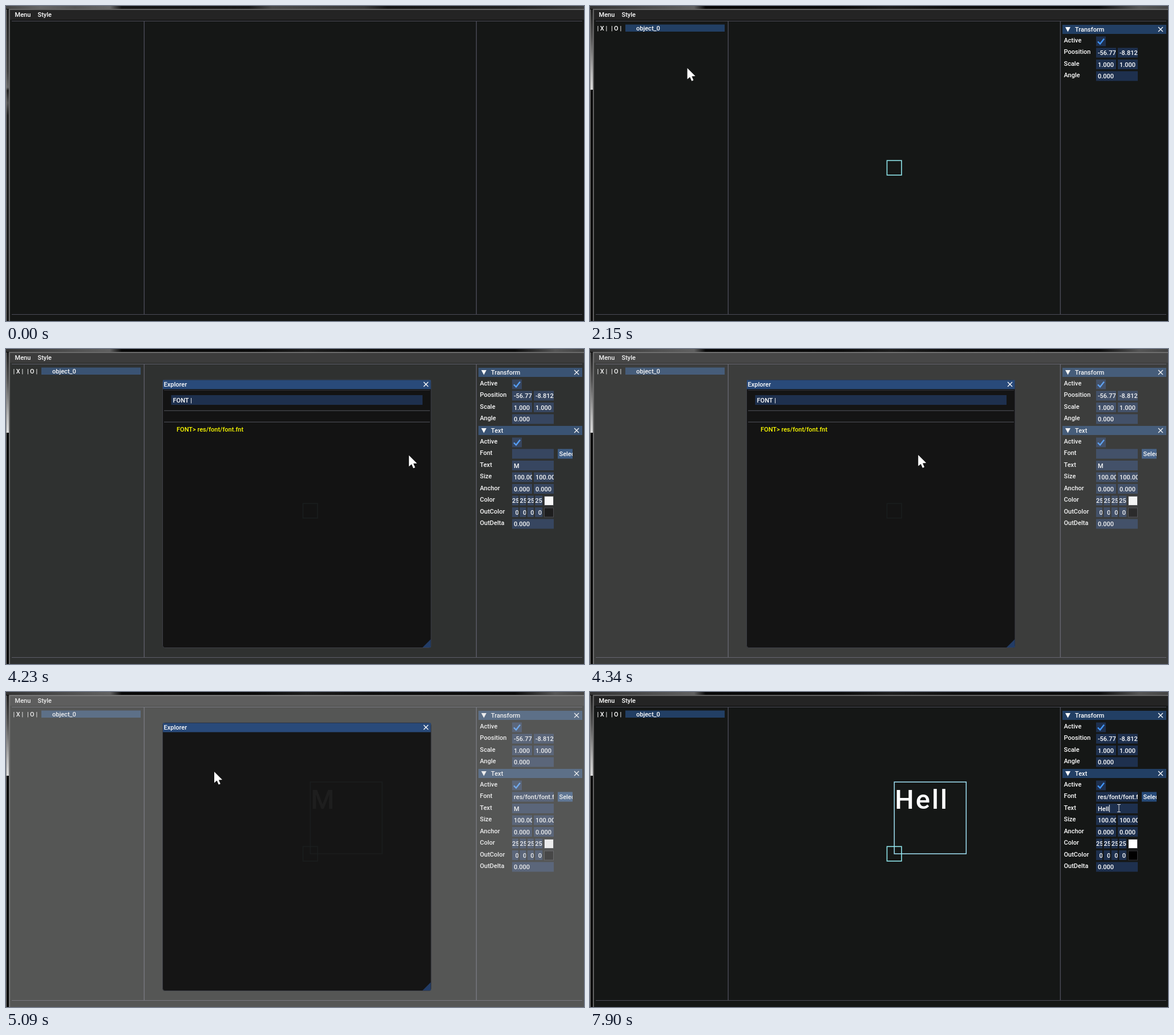
Animation of 1013 by 553 pixels, one loop 8000 ms. Source, as an HTML page with a canvas:

```html
<!DOCTYPE html>
<html lang="en">
<head>
<meta charset="utf-8">
<title>Scene editor</title>
<style>
  html, body { margin: 0; width: 100%; height: 100%; overflow: hidden; background: #151716; }
  canvas { display: block; }
</style>
</head>
<body>
<canvas id="stage" width="1013" height="553"></canvas>
<script>
const ctx = document.getElementById('stage').getContext('2d');
const LOOP = 8000, TICK = 108.33;
const FONT = '500 11px Roboto, sans-serif';
const LINE = '#4b4b57', FIELD = '#1e304e', HEADER = '#223f64', ACCENT = '#4296fa';

// Pointer path: time, x, y
const POINTER = [
  [100, 300, 310], [840, 141, 96.5], [1090, 141, 96.5], [1400, 112, 42], [1740, 112, 42],
  [2490, 250, 200], [2820, 250, 200], [3250, 926, 198], [3560, 956, 180],
  [3780, 966, 188], [4010, 966, 188], [4340, 567, 186], [4760, 365, 140],
  [5190, 365, 140], [5640, 934, 211], [5750, 934, 211], [6060, 927, 204], [LOOP, 927, 204]
];

const clamp = v => Math.max(0, Math.min(1, v));
const ramp = (t, a, b) => clamp((t - a) / (b - a));

function rect(x, y, w, h, color) {
  ctx.fillStyle = color;
  ctx.fillRect(x, y, w, h);
}

function text(s, x, midY, color = '#fff') {
  ctx.font = FONT;
  ctx.fillStyle = color;
  ctx.fillText(s, x, midY + 4);
}

function path(points, color, width) {
  ctx.beginPath();
  points.forEach(([x, y]) => ctx.lineTo(x, y));
  if (width) {
    ctx.strokeStyle = color;
    ctx.lineWidth = width;
    ctx.stroke();
  } else {
    ctx.fillStyle = color;
    ctx.fill();
  }
}

function outline(x, y, size, color) {
  ctx.strokeStyle = color;
  ctx.lineWidth = 1.6;
  ctx.strokeRect(x, y, size, size);
}

function clipped(x, y, w, h, draw) {
  ctx.save();
  ctx.beginPath();
  ctx.rect(x, y, w, h);
  ctx.clip();
  draw();
  ctx.restore();
}

function gradient(x, y, w, h, stops) {
  const g = w > h ? ctx.createLinearGradient(x, 0, x + w, 0) : ctx.createLinearGradient(0, y, 0, y + h);
  stops.forEach(([at, color]) => g.addColorStop(at, color));
  rect(x, y, w, h, g);
}

function closeIcon(x, y) {
  path([[x - 4, y - 4], [x + 4, y + 4]], '#fff', 1.2);
  path([[x + 4, y - 4], [x - 4, y + 4]], '#fff', 1.2);
}

function field(x, midY, w, value, pad = 3) {
  rect(x, midY - 8.5, w, 17, FIELD);
  clipped(x, midY - 9, w, 18, () => text(value, x + pad, midY));
}

function header(title, y) {
  rect(828, y - 8, 182, 16, HEADER);
  path([[833, y - 4], [842, y - 4], [837.5, y + 4.5]], '#fff');
  text(title, 850, y);
  closeIcon(1000, y);
}

function checkRow(y) {
  text('Active', 830.5, y);
  rect(887, y - 6, 17, 17, FIELD);
  path([[890, y + 3], [894, y + 7], [901, y - 2]], ACCENT, 2.4);
}

function row(label, y, ...values) {
  text(label, 830.5, y);
  const w = values.length === 1 ? 73 : 35;
  values.forEach((v, i) => field(887 + i * 38, y + 2, w, v));
}

function colorRow(label, y, value, pad, swatch) {
  text(label, 830.5, y);
  for (let i = 0; i < 4; i++) field(887 + i * 13.4, y + 2, i === 3 ? 13 : 11, value, pad);
  rect(943, y - 6, 17, 17, '#34353a');
  rect(944, y - 5, 15, 15, swatch);
}

function backdrop(t) {
  rect(0, 0, 1013, 553, '#080808');
  if (t < 100) {
    gradient(0, 0, 1013, 5, [[0, '#444'], [.06, '#666'], [.12, '#555'], [.18, '#666'], [.2, '#151515'], [.42, '#181818'],
      [.46, '#484848'], [.62, '#383838'], [.66, '#151515'], [.88, '#222'], [1, '#3c3c3c']]);
    gradient(0, 6, 5, 547, [[0, '#222'], [.2, '#444'], [.25, '#666'], [.26, '#222'], [.3, '#555'], [.34, '#222'], [1, '#1a1a1a']]);
  } else {
    gradient(0, 0, 1013, 5, [[0, '#333'], [.18, '#606060'], [.2, '#080808'], [.43, '#0a0a0a'],
      [.52, '#1c1c1c'], [.63, '#0e0e0e'], [.88, '#0a0a0a'], [.95, '#555'], [1, '#444']]);
    gradient(1, 6, 4, 141, [[0, '#222'], [.35, '#555'], [.8, '#bbb'], [1, '#ddd']]);
  }
  rect(0, 6, 1, 547, '#888');
}

function mainWindow() {
  rect(5, 5, 1008, 548, '#626262');
  rect(7, 7, 1006, 546, '#151716');
  rect(7, 7, 1006, 17, '#242424');
  text('Menu', 15.5, 15);
  text('Style', 55.5, 15);
  rect(10, 26, 1000, 1, LINE);
  rect(10, 541, 1000, 1, LINE);
  rect(241.5, 27, 1.4, 514, LINE);
  rect(823.7, 27, 1.4, 514, LINE);
}

function objectList(selected) {
  if (selected) rect(62, 32.5, 174, 12.5, HEADER);
  [['|', 12.5], ['X', 17.8], ['|', 27.5], ['|', 37], ['O', 42], ['|', 52.5]].forEach(([s, x]) => text(s, x, 38.6));
  text('object_0', 81, 38.6);
}

function transformPanel() {
  header('Transform', 41);
  checkRow(59.5);
  row('Poosition', 80, '-56.77', '-8.812');
  row('Scale', 100.5, '1.000', '1.000');
  row('Angle', 121, '0.000');
}

function textPanel(fontPath, value, caret) {
  header('Text', 143);
  checkRow(161.5);
  row('Font', 182, fontPath);
  rect(967, 175.5, 26, 17, '#264a78');
  clipped(967, 175, 26, 18, () => text('Select', 969.5, 184));
  row('Text', 202.5, value);
  if (caret) rect(890.5 + ctx.measureText(value).width, 198, 1, 13, '#fff');
  row('Size', 223, '100.000', '100.000');
  row('Anchor', 243.5, '0.000', '0.000');
  colorRow('Color', 264, '255', 0, '#fff');
  colorRow('OutColor', 284.5, '0', 5.5, '#000');
  row('OutDelta', 305, '0.000');
}

function sceneText(value) {
  outline(533.3, 158, 126, '#9bd9ec');
  ctx.font = '500 47px Roboto, sans-serif';
  ctx.letterSpacing = '3px';
  ctx.fillStyle = '#fff';
  ctx.fillText(value, 534.3, 205);
  ctx.letterSpacing = '0px';
}

function explorer(listed) {
  ctx.beginPath();
  ctx.roundRect(274.5, 54, 470.5, 470.5, 4);
  ctx.fillStyle = 'rgba(18,18,18,.94)';
  ctx.fill();
  ctx.strokeStyle = '#3d3f46';
  ctx.lineWidth = 1;
  ctx.stroke();
  rect(275, 54.5, 469.5, 16, '#294a7a');
  text('Explorer', 276.5, 62);
  closeIcon(736, 62);
  path([[744.5, 509.5], [744.5, 524], [730, 524]], '#223c66');
  if (!listed) return;
  rect(277, 72, 466, 1, '#303138');
  field(289.5, 89.5, 440.5, 'FONT |');
  rect(277, 107.7, 466, 1, '#55565e');
  rect(277, 127.7, 466, 1, '#55565e');
  text('FONT> res/font/font.fnt', 299, 141, '#ff0');
}

function pointer(t) {
  if (t < 100) return;
  const step = Math.max(100, Math.floor((t + 8) / TICK) * TICK);
  const i = Math.max(1, POINTER.findIndex(p => p[0] >= step));
  const [t0, x0, y0] = POINTER[i - 1], [t1, x1, y1] = POINTER[i];
  const k = ramp(step, t0, t1);
  const x = x0 + (x1 - x0) * k, y = y0 + (y1 - y0) * k;
  const overField = x > 887 && x < 955 && y > 175 && y < 214;
  if (overField) {
    path([[x, y - 6], [x, y + 6]], '#ddd', 1);
    path([[x - 3, y - 6.5], [x + 3, y - 6.5]], '#ddd', 1);
    path([[x - 3, y + 6.5], [x + 3, y + 6.5]], '#ddd', 1);
  } else {
    path([[0, 0], [0, 19.5], [4.6, 15.6], [7.7, 22.6], [10.8, 21.2], [7.8, 14.4], [14, 14]]
      .map(([dx, dy]) => [x + dx, y + dy]), '#fff');
  }
}

function typed(t) {
  if (t < 6490) return 'M';
  return 'Hell'.slice(0, [7250, 7580, 7680, 7900].filter(at => t >= at).length);
}

function draw(t) {
  const value = typed(t), selected = t >= 1400, hasFont = t >= 4980;
  backdrop(t);
  mainWindow();
  if (t >= 970) objectList(selected);
  if (selected) {
    if (hasFont) sceneText(value);
    outline(520.5, 271.3, 25.5, '#8fe6ec');
    transformPanel();
  }
  if (t >= 2820) textPanel(hasFont ? 'res/font/font.fnt' : '', value, t >= 5960);
  const dim = .35 * ramp(t, 4010, 4560) * (1 - ramp(t, 5190, 5500));
  if (dim) rect(6, 6, 1007, 547, `rgba(204,204,204,${dim})`);
  if (t >= 4010 && t < 5190) explorer(!hasFont);
  pointer(t);
}

function frame() {
  draw(performance.now() % LOOP);
  requestAnimationFrame(frame);
}
frame();
</script>
</body>
</html>
```
